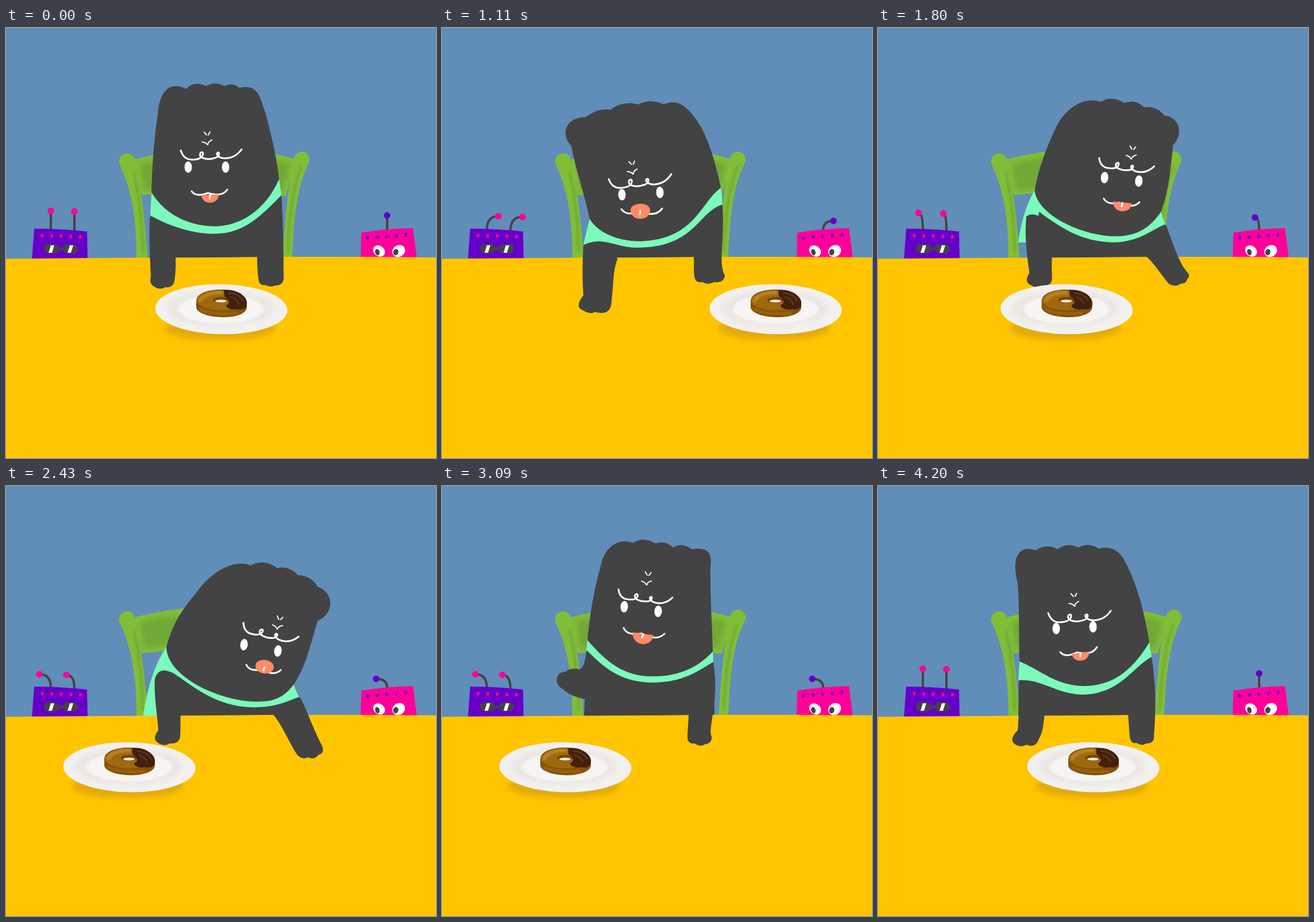
Animation of 748x748 px, one loop 4.23 s. Source, as an HTML page:

```html
<!DOCTYPE html>
<html lang="en">
<head>
<meta charset="utf-8">
<title>Doughnut on the table</title>
<style>
html, body { margin: 0; height: 100%; overflow: hidden; background: #618db9; }
svg { display: block; width: 100%; height: 100%; }
.line { fill: none; stroke: #fff; stroke-width: 3; stroke-linecap: round; stroke-linejoin: round; }
.line path { vector-effect: non-scaling-stroke; }
.stem { fill: none; stroke: #434343; stroke-width: 4; stroke-linecap: round; }
.dark { fill: #434343; }
</style>
</head>
<body>
<svg viewBox="0 0 748 748">
  <defs>
    <filter id="soft" x="-30%" y="-30%" width="160%" height="160%"><feGaussianBlur stdDeviation="4"/></filter>
    <filter id="soft2" x="-30%" y="-30%" width="160%" height="160%"><feGaussianBlur stdDeviation="1.5"/></filter>
  </defs>
  <rect width="748" height="748" fill="#618db9"/>

  <g id="chair" fill="#82bd38">
    <path d="M222 229Q290 211 365 209Q440 209 503 228L487 292Q365 275 236 291Z"/>
    <path d="M234 236Q300 222 365 221Q440 221 494 236L482 282Q365 266 240 282Z" fill="#5f8f35" opacity=".45" filter="url(#soft)"/>
    <path d="M197 236C193 214 224 212 224 231C236 285 243 340 246 402L227 402C227 340 221 285 197 236Z"/>
    <path d="M528 232C530 210 502 210 501 229C490 275 486 330 481 402L498 402C500 330 506 275 528 232Z"/>
    <path d="M222 250Q236 310 238 390M514 240Q494 290 490 390" fill="none" stroke="#5f8f35" stroke-width="5" opacity=".35" filter="url(#soft2)"/>
  </g>

  <g id="antennas"></g>
  <path d="M49 349Q95 349 141 354L142 404H45Z" fill="#6600c8"/>
  <g id="pinkDots" fill="#ff0098"></g>
  <g class="dark">
    <rect x="66" y="376" width="26" height="16" rx="8"/>
    <rect x="99" y="376" width="26" height="16" rx="8"/>
    <rect x="88" y="382" width="15" height="5"/>
  </g>
  <path d="M78 378h6l-4 13h-6zM111 378h6l-4 13h-6z" fill="#fff"/>
  <path d="M618 356Q660 349 708 348L715 404H617Z" fill="#ff0098"/>
  <g id="purpleDots" fill="#6600c8"></g>
  <g fill="#fff">
    <ellipse cx="649" cy="388" rx="11" ry="9" transform="rotate(35 649 388)"/>
    <ellipse cx="683" cy="388" rx="11.5" ry="10" transform="rotate(-30 683 388)"/>
  </g>
  <ellipse class="dark" cx="646" cy="390" rx="3.8" ry="5.5" transform="rotate(-15 646 390)"/>
  <ellipse class="dark" cx="678" cy="390" rx="4.5" ry="5.5" transform="rotate(15 678 390)"/>

  <path id="torso" class="dark"/>
  <path id="strap" fill="#7bfabb"/>
  <path id="head" class="dark"/>
  <path d="M0 401.5Q190 399.5 374 399Q560 397 748 399V748H0Z" fill="#ffc500"/>
  <path id="armL" class="dark"/>
  <path id="armR" class="dark"/>

  <g id="face">
    <g class="line">
      <path id="mark" stroke-width="2" d="M-5-11l4 5M5-11l-3 5M-9 6q7 1 9 5M8 3q-7 3-7 8"/>
      <path id="brow" d="M0 0C5 17 17 16 25 15C40 13 38-1 32 5C28 15 47 16 53 14C66 13 64 0 59 6C60 17 86 19 100 0"/>
      <path id="mouth" d="M0 0C10 16 30 12 45 7C60 12 85 20 100 0"/>
    </g>
    <ellipse id="eyeL" rx="6.5" ry="10" fill="#fff"/>
    <ellipse id="eyeR" rx="6.5" ry="10" fill="#fff"/>
    <g id="tongue"><path fill="#ff8a68"/><path class="line" d="M0 1L-1 7"/></g>
  </g>

  <g id="plate">
    <ellipse cx="372" cy="523" rx="97" ry="20" fill="#dca510" opacity=".8" filter="url(#soft)"/>
    <ellipse cx="374.5" cy="489.2" rx="115" ry="43.4" fill="#f3f1f0" transform="rotate(1 374 489)"/>
    <ellipse cx="372" cy="488" rx="94" ry="32" fill="#ebe7e3" filter="url(#soft)"/>
    <ellipse cx="374" cy="489" rx="74" ry="25" fill="#f7f5f4" filter="url(#soft2)"/>
    <path d="M331 474C333 449 413 448 419 476V487C414 510 337 507 331 487Z" fill="#855207"/>
    <ellipse cx="374" cy="474" rx="42" ry="17" fill="#a0680e"/>
    <path d="M338 474Q346 460 374 460" fill="none" stroke="#bd8420" stroke-width="6" stroke-linecap="round" filter="url(#soft2)"/>
    <path d="M336 489Q360 500 402 496" fill="none" stroke="#9a630b" stroke-width="5" filter="url(#soft2)"/>
    <ellipse cx="374" cy="473" rx="14" ry="5" fill="#754405"/>
    <ellipse cx="374" cy="475" rx="10" ry="2.6" fill="#f3ead9"/>
    <path d="M379 456C400 453 420 466 419 480C419 489 410 491 402 489C392 491 382 487 383 482C393 478 386 470 380 467Z" fill="#43200e"/>
    <path d="M387 461Q406 462 412 475M390 468Q402 470 405 481" fill="none" stroke="#6b3a22" stroke-width="2"/>
  </g>
</svg>
<script>
// face: brow ends, eye centres, mouth ends, tongue (x y width drop), forehead mark
const poses = {
  rest: {
    torso: 'M253 286L250 402L482 402L476 270',
    strap: 'M253 286Q252 306 251 326L251 326L251 326C285 345 325 358 363 358C415 358 445 325 479 291L479 291L479 291Q477 277 475 262Z',
    head: 'M253 286C254 240 258 190 264 150C268 102 290 94 313 106Q328 91 348 101Q363 92 380 101Q393 94 406 104C438 98 440 115 452 150C461 185 471 225 475 263C450 320 405 344 365 345C325 345 280 330 253 286Z',
    armL: 'M250 328C249 365 250 395 252 432Q248 446 260 451Q268 456 277 451Q291 452 293 440C296 420 295 405 295 395L290 350Q270 337 250 328Z',
    armR: 'M437 395C437 410 437 420 439 435Q440 449 451 447Q460 452 468 448Q482 448 483 436C483 390 482 330 479 290Q465 325 440 345Z',
    face: '304 213 410 211 317 242 382 242 323 284 385 281 355 290 15 14 350 192'
  },
  pushRight: {
    torso: 'M257 332L246 402L486 402L486 290',
    strap: 'M257 332Q251 355 246 377L246 377L246 377C285 362 300 382 340 382C440 382 445 320 488 307L488 307L488 307Q487 292 485 278Z',
    head: 'M257 332C248 290 232 245 225 205C205 185 215 155 250 155Q270 139 293 142Q315 126 341 133Q363 122 386 133C412 121 428 140 443 160C463 190 475 230 485 278C450 303 440 368 345 371C300 371 268 352 257 332Z',
    armL: 'M246 378C244 410 244 440 246 465Q230 485 245 491Q257 499 266 494Q294 502 295 475C299 440 297 425 305 402L300 379Q272 364 246 378Z',
    armR: 'M438 400C439 410 437 420 439 432Q440 444 453 442Q463 448 473 442Q491 444 492 430C480 410 492 370 488 307Q465 325 445 350Z',
    face: '290 263 399 254 313 290 379 286 312 315 383 314 345 321 17 20 331 243'
  },
  raiseRight: {
    torso: 'M258 300L255 402L480 402L477 270',
    strap: 'M258 288Q257 299 257 309L257 309L257 309C290 335 325 346 362 346C415 346 445 300 477 284L477 284L477 284Q476 273 475 262Z',
    head: 'M258 290C258 240 262 180 265 140C264 112 278 103 301 107Q316 95 332 103Q347 90 362 100Q380 88 400 101C428 89 440 108 449 135C461 175 471 215 475 262C445 312 405 334 362 334C315 333 275 312 258 290Z',
    armL: 'M256 310C250 345 248 380 260 428Q254 447 268 448Q276 453 284 449Q303 453 302 436C298 415 300 405 300 392L305 370Q290 335 256 310Z',
    armR: 'M470 398C485 398 495 397 506 396Q525 395 530 384Q535 374 526 368Q523 356 506 358C488 354 484 320 477 286Q460 315 445 345Z',
    face: '322 200 417 193 350 225 411 220 337 265 403 265 371 271 17 12 370 170'
  },
  leanRight: {
    torso: 'M290 330L290 402L500 402L508 365',
    strap: 'M279 280Q250 322 238 402L275 402L290 324C335 357 372 384 430 385C470 385 490 374 510 367L510 367L510 367Q504 357 500 345Z',
    head: 'M279 280C290 235 315 205 330 187C352 155 392 125 426 138Q449 126 472 143Q492 138 508 155Q531 156 542 175C570 185 573 220 542 235C531 270 522 315 500 346C480 372 460 376 430 375C372 373 280 333 279 280Z',
    armL: 'M259 335C257 365 263 395 265 425Q253 440 265 447Q275 454 284 448Q302 449 303 435C304 420 303 405 304 395L300 332Q268 308 259 335Z',
    armR: 'M463 395C480 415 492 445 506 467Q515 477 525 472Q537 477 543 468Q555 465 550 452C535 425 522 385 511 367Q487 376 475 384Z',
    face: '413 238 509 262 414 276 473 287 418 311 478 320 450 318 16 17 474 238'
  },
  raiseLeft: {
    torso: 'M252 285L247 402L474 402L472 300',
    strap: 'M253 268Q252 277 251 285L251 285L251 285C285 320 315 342 368 342C420 341 445 322 472 306L472 306L472 306Q472 297 471 288Z',
    head: 'M253 268C257 220 266 175 277 135C285 103 310 90 332 99Q351 87 371 100Q388 94 402 107Q418 97 434 110C458 106 471 112 467 140C466 190 470 240 471 288C440 322 400 332 365 331C315 331 285 305 253 268Z',
    armL: 'M251 287C250 300 247 315 240 319Q225 315 215 323Q201 324 200 335Q198 347 210 353C220 363 235 368 249 371L260 380Q270 320 251 287Z',
    armR: 'M429 395C429 410 427 425 427 437Q427 449 440 448Q450 455 458 449Q470 448 469 435C462 425 483 370 472 307Q455 335 440 350Z',
    face: '307 180 401 194 317 210 376 218 316 247 387 257 350 257 18 18 357 161'
  },
  leanLeft: {
    torso: 'M219 365L227 402L437 402L437 330',
    strap: 'M227 345Q223 357 217 367L217 367L217 367C237 374 257 385 297 385C355 384 392 357 437 324L452 402L489 402Q477 322 448 280Z',
    head: 'M227 346C205 315 196 270 185 235C154 220 157 185 185 175Q196 156 219 155Q235 138 255 143Q278 126 301 138C335 125 375 155 397 187C412 205 437 235 448 280C447 333 355 373 297 375C267 376 247 372 227 346Z',
    armL: 'M216 367C205 385 192 425 177 452Q172 465 184 468Q190 477 202 472Q212 477 221 467C235 445 247 415 264 395L252 384Q240 375 216 367Z',
    armR: 'M423 395C424 405 423 420 424 435Q425 449 443 448Q452 454 462 447Q474 440 462 425C464 395 470 365 468 335Q459 308 427 332Z',
    face: '230 263 326 237 249 290 299 282 264 320 323 310 293 318 14 18 265 237'
  },
  settle: {
    torso: 'M246 305L244 402L481 402L474 280',
    strap: 'M246 305Q245 322 244 338L244 338L244 338C285 335 310 362 355 363C420 362 440 318 476 297L476 297L476 297Q474 285 472 272Z',
    head: 'M246 305C245 250 246 210 243 170C230 120 248 102 274 112Q293 99 312 110Q330 97 348 107Q367 97 384 109C415 101 427 122 440 153C456 190 465 230 472 272C440 325 405 348 357 348C310 347 285 322 246 305Z',
    armL: 'M245 339C244 370 246 395 243 425Q227 441 238 449Q248 456 258 450Q274 457 280 440C288 425 288 412 290 395L290 355Q270 338 245 339Z',
    armR: 'M435 395C436 412 437 425 438 437Q440 449 450 447Q458 453 466 448Q481 448 480 435C484 390 483 340 476 298Q462 325 440 350Z',
    face: '296 221 405 217 310 248 374 245 317 289 381 280 352 290 15 14 341 198'
  }
};

// time, pose, antenna bend, plate offset
const keys = [
  [0, 'rest', 0, 0], [180, 'rest', 0, 0],
  [510, 'pushRight', 1, 206], [1380, 'pushRight', 1, 206],
  [1590, 'raiseRight', 1, 206], [1650, 'raiseRight', 1, 206],
  [1890, 'leanRight', -1, -160], [2610, 'leanRight', -1, -160],
  [3060, 'raiseLeft', -1, -160], [3090, 'raiseLeft', -1, -160],
  [3150, 'raiseLeft', 0, -160], [3330, 'leanLeft', 1, 0],
  [4080, 'leanLeft', 1, 0], [4200, 'settle', 0, 0], [4230, 'rest', 0, 0]
];
const licks = [[870, 1110, 1380], [2190, 2430, 2610], [3630, 3810, 4080]];
// base x, base y, height, reach to the left and right, colour
const antennas = [
  [78, 351, 33, 20, 20, '#ff0098'],
  [119, 353, 34, 14, 21, '#ff0098'],
  [663, 351, 25, 19, 18, '#6600c8']
];

const $ = id => document.getElementById(id);
const set = (el, name, value) => el.setAttribute(name, value);
const clamp = v => Math.min(1, Math.max(0, v));
const lerp = (a, b, t) => a + (b - a) * t;
const number = /-?[\d.]+/g;

function mix(a, b, t) {
  const ends = b.match(number);
  let i = 0;
  return a.replace(number, v => lerp(+v, +ends[i++], t).toFixed(1));
}

const slope = (x1, y1, x2, y2) => Math.atan2(y2 - y1, x2 - x1) * 180 / Math.PI;
const at = (x, y, turn, size = 1) => `translate(${x} ${y}) rotate(${turn}) scale(${size})`;
const between = (x1, y1, x2, y2) =>
  at(x1, y1, slope(x1, y1, x2, y2), Math.hypot(x2 - x1, y2 - y1) / 100);

const dots = (x, y, rise) => Array.from({ length: 5 }, (_, i) =>
  `<ellipse cx="${x + i * 16.6}" cy="${y + i * rise}" rx="2.6" ry="3.2"/>`).join('');
$('pinkDots').innerHTML = dots(63, 361, .5);
$('purpleDots').innerHTML = dots(629, 365, -1.4);

function drawAntennas(bend) {
  $('antennas').innerHTML = antennas.map(([x, y, h, left, right, color]) => {
    const tipX = x + bend * (bend < 0 ? left : right), tipY = y - h + 9.5 * Math.abs(bend);
    return `<path class="stem" d="M${x} ${y}Q${x} ${tipY} ${tipX} ${tipY}"/>
      <circle cx="${tipX}" cy="${tipY}" r="5.8" fill="${color}"/>`;
  }).join('');
}

function drawFace(text, lick) {
  const n = text.split(' ').map(Number);
  const brow = n.slice(0, 4), mouth = n.slice(8, 12);
  const tilt = slope(...brow);
  const [x, y, w, drop, markX, markY] = n.slice(12);
  set($('brow'), 'transform', between(...brow));
  set($('mouth'), 'transform', between(...mouth));
  set($('mark'), 'transform', at(markX, markY, tilt));
  set($('eyeL'), 'transform', at(n[4], n[5], tilt / 2));
  set($('eyeR'), 'transform', at(n[6], n[7], tilt / 2));
  const up = -15 * lick, down = (drop - 5 * lick) * 4 / 3;
  set($('tongue'), 'transform', at(x, y - 4 * lick, slope(...mouth)));
  set($('tongue').firstChild, 'd', `M${-w} 0C${-w} ${up} ${w} ${up} ${w} 0C${w} ${down} ${-w} ${down} ${-w} 0Z`);
  set($('face'), 'transform', `translate(0 ${2 * Math.sin(Math.PI * lick)})`);
}

function draw(now) {
  const t = now % 4230;
  const i = keys.findIndex(k => k[0] > t);
  const [t0, name0, bend0, plate0] = keys[i - 1];
  const [t1, name1, bend1, plate1] = keys[i];
  const u = (t - t0) / (t1 - t0);
  const k = u * u * (3 - 2 * u);
  const from = poses[name0], to = poses[name1];
  for (const part of ['torso', 'strap', 'head', 'armL', 'armR'])
    set($(part), 'd', mix(from[part], to[part], k));
  const lick = Math.max(...licks.map(([a, b, c]) => clamp((t - a) / (b - a)) * clamp(1 - (t - c) / 120)));
  drawFace(mix(from.face, to.face, k), lick);
  drawAntennas(lerp(bend0, bend1, k));
  set($('plate'), 'transform', `translate(${lerp(plate0, plate1, k)} 0)`);
}

const start = performance.now();
function loop() {
  draw(performance.now() - start);
  requestAnimationFrame(loop);
}
loop();
</script>
</body>
</html>
```
